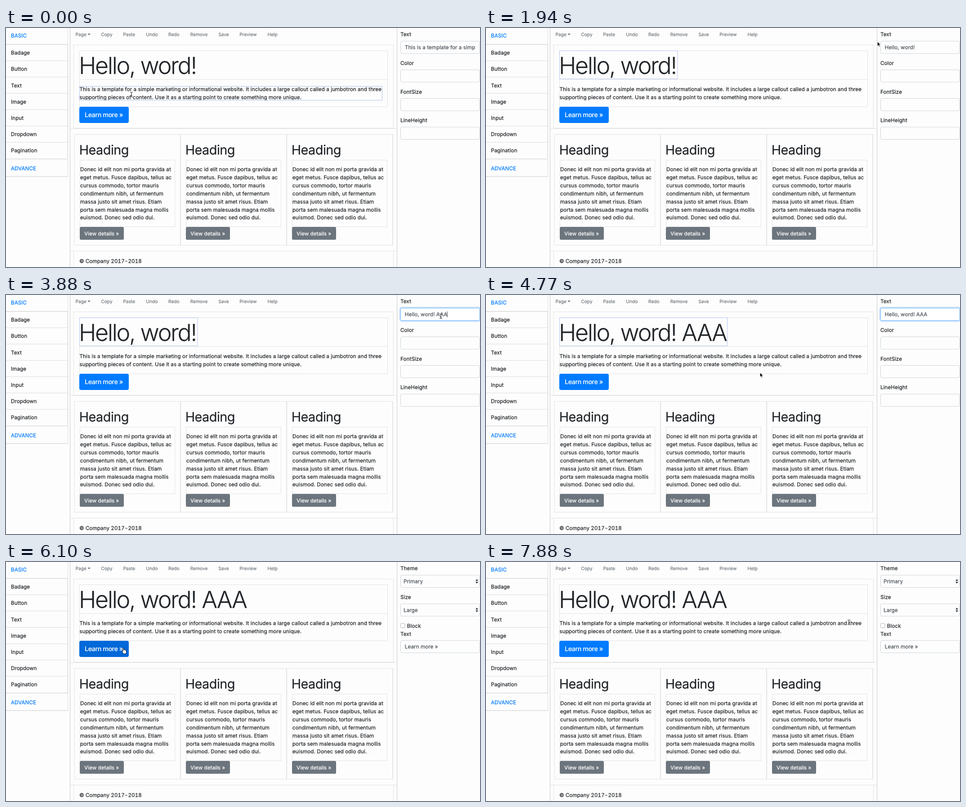
Animation, 1054 px wide and 531 px high, one loop 8 s. Source, as an HTML page:

```html
<!DOCTYPE html>
<html lang="en">
<head>
<meta charset="utf-8">
<title>Page builder</title>
<style>
  html, body { margin: 0; width: 100%; height: 100%; overflow: hidden; background: #fdfdfd; }
  svg { display: block; width: 1054px; height: 531px; }
  text {
    --ink: #212529;
    font: 400 11.6px Inter, "Open Sans", sans-serif;
    font-optical-sizing: none;
    letter-spacing: .1px;
    text-rendering: geometricPrecision;
    white-space: pre;
    fill: var(--ink);
    stroke: var(--ink);
    stroke-width: .25px;
  }
  .title { font-size: 51.9px; font-weight: 300; letter-spacing: -2.3px; }
  .head { font-size: 28.8px; letter-spacing: -.52px; }
  .nav { --ink: #686e74; font-size: 10.2px; letter-spacing: 0; stroke-width: .15px; }
  .link { --ink: #007bff; }
  .value { --ink: #495057; }
  .btn { --ink: #fff; font-weight: 500; letter-spacing: 0; stroke-width: .1px; }
  .big { font-size: 14.4px; letter-spacing: -.5px; }
  .foot { font-variant-numeric: tabular-nums; }
  .frame { fill: none; stroke: #e2e2e2; }
  .rule { stroke: #dcdcdc; }
  .edge { stroke: #c9c9c9; }
  .pick { fill: none; stroke: #b3c1f1; }
  .field { fill: #fdfdfd; stroke: #ced4da; }
  .focus { fill: #fff; stroke: #80bdff; }
  .glow { fill: none; stroke: #007bff; stroke-opacity: .25; stroke-width: 2.2; }
  .caret { stroke: #333; }
  .grey { fill: #6c757d; }
</style>
</head>
<body>
<svg viewBox="0 0 1054 531" xmlns="http://www.w3.org/2000/svg">
  <defs><clipPath id="inner"><rect x="886" y="30" width="158" height="26"/></clipPath></defs>
  <g id="page"></g>
  <g id="panel"></g>
  <g id="cursor">
    <g id="beam" fill="none" stroke-linecap="round">
      <path d="M-2.5-5.5Q0-5.5 0-3.8V3.8Q0 5.5-2.5 5.5M2.5-5.5Q0-5.5 0-3.8M2.5 5.5Q0 5.5 0 3.8M-1.4 1.5H1.4" stroke="#fff" stroke-width="2" stroke-opacity=".6"/>
      <path d="M-2.5-5.5Q0-5.5 0-3.8V3.8Q0 5.5-2.5 5.5M2.5-5.5Q0-5.5 0-3.8M2.5 5.5Q0 5.5 0 3.8M-1.4 1.5H1.4" stroke="#222" stroke-width="1"/>
    </g>
    <path id="arrow" d="M.3.3V10.4L2.6 8.3L4.1 11.8L5.9 11L4.4 7.6H7.5Z" fill="#000" stroke="#fff" stroke-width=".9"/>
    <path id="hand" d="M-.9 6.4V.2Q-.9-1 0-1T1 .2V3.6Q2-.1 2.8 3.9Q4 2.9 4.6 4.3Q6.4 3.7 6.4 5.5V8.4Q6.4 9.8 5.4 11.9H.4Q-.5 9.9-2.6 7.5Q-3.3 6-2 5.8Q-1.4 5.8-.9 6.4Z" fill="#fff" stroke="#111" stroke-width=".9"/>
  </g>
</svg>
<script>
const LOOP = 8000, END = LOOP;
const $ = id => document.getElementById(id);
const page = $('page'), panel = $('panel');

function add(parent, tag, attrs, content) {
  const el = document.createElementNS('http://www.w3.org/2000/svg', tag);
  for (const key in attrs) el.setAttribute(key, attrs[key]);
  if (content) el.textContent = content;
  parent.append(el);
  return el;
}
const group = parent => add(parent, 'g', {});
const text = (g, x, y, str, cls = '') => add(g, 'text', { x, y, class: cls }, str);
const line = (g, x1, y1, x2, y2, cls) => add(g, 'line', { x1, y1, x2, y2, class: cls });
const box = (g, x1, y1, x2, y2, cls, rx = 0) =>
  add(g, 'rect', { x: x1, y: y1, width: x2 - x1, height: y2 - y1, rx, class: cls });

// Stepped animation: steps are [ms, css properties], each held until the next.
function hold(el, steps) {
  const frames = steps.map(([ms, css]) => ({ offset: ms / LOOP, easing: 'steps(1, end)', ...css }));
  frames.push({ offset: 1, ...steps[steps.length - 1][1] });
  el.animate(frames, { duration: LOOP, iterations: Infinity, delay: -5 });
}
function show(el, from, to) {
  const steps = [[from, { opacity: 1 }]];
  if (from > 0) steps.unshift([0, { opacity: 0 }]);
  if (to < END) steps.push([to, { opacity: 0 }]);
  hold(el, steps);
  return el;
}

// Sidebar
['Badage', 'Button', 'Text', 'Image', 'Input', 'Dropdown', 'Pagination'].forEach((name, i) => {
  text(page, 11, 59.2 + i * 36.2, name);
  if (i) line(page, 0, 36.5 + i * 36.25, 137, 36.5 + i * 36.25, 'rule');
});
text(page, 11, 21.2, 'BASIC', 'link');
text(page, 11, 315.5, 'ADVANCE', 'link');
[36.5, 291, 330].forEach(y => line(page, 0, y, 138, y, 'edge'));
line(page, 137.5, 37, 137.5, 290, 'edge');
line(page, 137.5, 292, 137.5, 330, 'rule');
line(page, 137.5, 0, 137.5, 36, 'rule');
line(page, 142.5, 0, 142.5, 531, 'edge');
line(page, 869.5, 0, 869.5, 531, 'edge');

// Menu
const menu = { Page: 154.5, Copy: 211.3, Paste: 260.5, Undo: 311.3, Redo: 361, Remove: 409.8,
  Save: 472.2, Preview: 519.3, Help: 581.5 };
for (const name in menu) menu[name] = text(page, menu[name], 18, name, 'nav');
add(page, 'path', { d: 'M181.5 12.5H188L184.75 16Z', fill: '#686e74' });
hold(menu.Page, [[0, { fill: '#686e74' }], [6840, { fill: '#4d4d4d' }], [7140, { fill: '#686e74' }]]);

// Jumbotron
box(page, 150.5, 37.5, 861.5, 222.5, 'frame');
line(page, 143, 223.5, 869, 223.5, 'frame');
box(page, 163.5, 50.5, 848.5, 114.5, 'frame');
box(page, 163.5, 114.5, 848.5, 175, 'frame');
show(text(page, 162, 102, 'Hello, word!', 'title'), 0, 4180);
show(text(page, 162, 102, 'Hello, word! AAA', 'title'), 4180, END);
text(page, 163.5, 140.3, 'This is a template for a simple marketing or informational website. It includes a large callout called a jumbotron and three');
text(page, 163.5, 158.2, 'supporting pieces of content. Use it as a starting point to create something more unique.');
const learn = box(page, 163, 175, 273, 211, '', 4);
text(page, 175, 198.3, 'Learn more »', 'btn big');
hold(learn, [[0, '#007bff'], [5500, '#0074f0'], [5650, '#0069d9'], [6400, '#0072ec'], [6550, '#007bff']]
  .map(([ms, fill]) => [ms, { fill }]));

// Selection outlines
show(box(page, 163.5, 129.5, 836.5, 160.5, 'pick'), 0, 1340);
show(box(page, 163.5, 50.5, 426, 113, 'pick'), 1340, 4180);
show(box(page, 163.5, 50.5, 536.5, 113, 'pick'), 4180, 5950);

// Columns
const lorem = ['Donec id elit non mi porta gravida at', 'eget metus. Fusce dapibus, tellus ac',
  'cursus commodo, tortor mauris', 'condimentum nibh, ut fermentum', 'massa justo sit amet risus. Etiam',
  'porta sem malesuada magna mollis', 'euismod. Donec sed odio dui.'];
for (let x = 152; x < 800; x += 236) {
  box(page, x + .2, 236.5, x + 236, 482.5, 'frame');
  line(page, x + 236, 236, x + 236, 483, 'rule');
  text(page, x + 10.7, 281.3, 'Heading', 'head');
  box(page, x + 12.5, 293.5, x + 223.5, 441.5, 'frame');
  lorem.forEach((str, i) => text(page, x + 13, 318.4 + i * 17.83, str));
  box(page, x + 12, 442, x + 110, 470.4, 'grey', 3);
  text(page, x + 22, 460.6, 'View details »', 'btn');
}

// Footer
line(page, 143, 495.5, 869, 495.5, 'frame');
box(page, 150.5, 495.5, 861.5, 540, 'frame');
text(page, 163, 521.5, '© Company 2017-2018', 'foot');

// Properties panel
const field = (g, y) => box(g, 877.5, y, 1053, y + 27.5, 'field', 3);
const label = (g, y, str, x = 877) => text(g, x, y + 4.3, str);

const textProps = show(group(panel), 0, 5950);
['Text', 'Color', 'FontSize', 'LineHeight'].forEach((name, i) => {
  label(textProps, 14 + i * 63.6, name);
  field(textProps, 29.2 + i * 63.6);
});
const focus = group(textProps);
box(focus, 876, 27.7, 1054.5, 58.2, 'glow', 4);
box(focus, 877.5, 29.2, 1053, 56.7, 'focus', 3);
hold(focus, [[0, { opacity: 0 }], [2840, { opacity: .5 }], [2990, { opacity: 1 }]]);

const long = text(textProps, 886.8, 47.2, 'This is a template for a simple marketing', 'value');
long.setAttribute('clip-path', 'url(#inner)');
show(long, 0, 1340);
const typed = [1340, 3590, 3740, 3880, 5950];
typed.slice(0, 4).forEach((ms, i) => {
  const str = 'Hello, word!' + (i ? ' ' + 'A'.repeat(i) : '');
  show(text(textProps, 886.8, 47.2, str, 'value'), ms, typed[i + 1]);
});
const caret = line(textProps, 0, 36.5, 0, 49.5, 'caret');
hold(caret, [[0, 0, 0], [2840, 954.5, 1], [3140, 957, 1], [3590, 965, 1], [3740, 973, 1], [3880, 981.3, 1], [4480, 981.3, 0]]
  .map(([ms, x, opacity]) => [ms, { transform: `translate(${x}px, 0px)`, opacity }]));

const buttonProps = show(group(panel), 5950, END);
[['Theme', 'Primary'], ['Size', 'Large']].forEach(([name, value], i) => {
  const y = i * 63.6;
  label(buttonProps, 14 + y, name);
  field(buttonProps, 29.2 + y);
  text(buttonProps, 884, 47.2 + y, value, 'value');
  add(buttonProps, 'path', { d: `M1044 ${42 + y}H1050L1047 ${38 + y}ZM1044 ${44 + y}H1050L1047 ${48 + y}Z`, fill: '#343a40' });
});
add(buttonProps, 'rect', { x: 877.5, y: 136.7, width: 9.5, height: 9.5, rx: 2, fill: '#fff', stroke: '#b0b0b0' });
label(buttonProps, 141.5, 'Block', 891.8);
label(buttonProps, 159.3, 'Text');
field(buttonProps, 174.2);
text(buttonProps, 886.8, 192.2, 'Learn more »', 'value');

// Pointer: [ms, x, y, shape]
const I = 'beam', A = 'arrow', H = 'hand';
const path = [
  [0, 279, 148, I], [300, 280, 144, I], [450, 282, 133, I], [600, 286, 115, I], [750, 290, 101, I], [890, 292, 94, I],
  [1040, 292, 92, I], [1490, 296, 91, I], [1640, 330, 86, I], [1790, 462, 70, A], [1940, 870, 30, A], [2090, 935, 42, I],
  [2240, 959, 46, I], [2390, 963, 46, I], [2540, 967, 47, I], [4480, 960, 48, I], [4630, 789, 71, A], [4770, 609, 172, A],
  [4920, 470, 186, A], [5060, 380, 190, A], [5210, 320, 191, A], [5350, 294, 191, A], [5500, 261, 192, H],
  [6400, 205, 150, I], [6550, 179.5, 86, I], [6690, 178, 30, A], [6840, 179, 12, H], [6990, 181, 12, H],
  [7140, 227, 25, A], [7280, 274, 98, I], [7430, 337, 152, I], [7730, 773, 106, A], [7880, 807, 134, I]
];
hold($('cursor'), path.map(([ms, x, y]) => [ms, { transform: `translate(${x}px, ${y}px)` }]));
[I, A, H].forEach(id => hold($(id), path.map(([ms, , , shape]) => [ms, { opacity: +(shape === id) }])));
</script>
</body>
</html>
```
